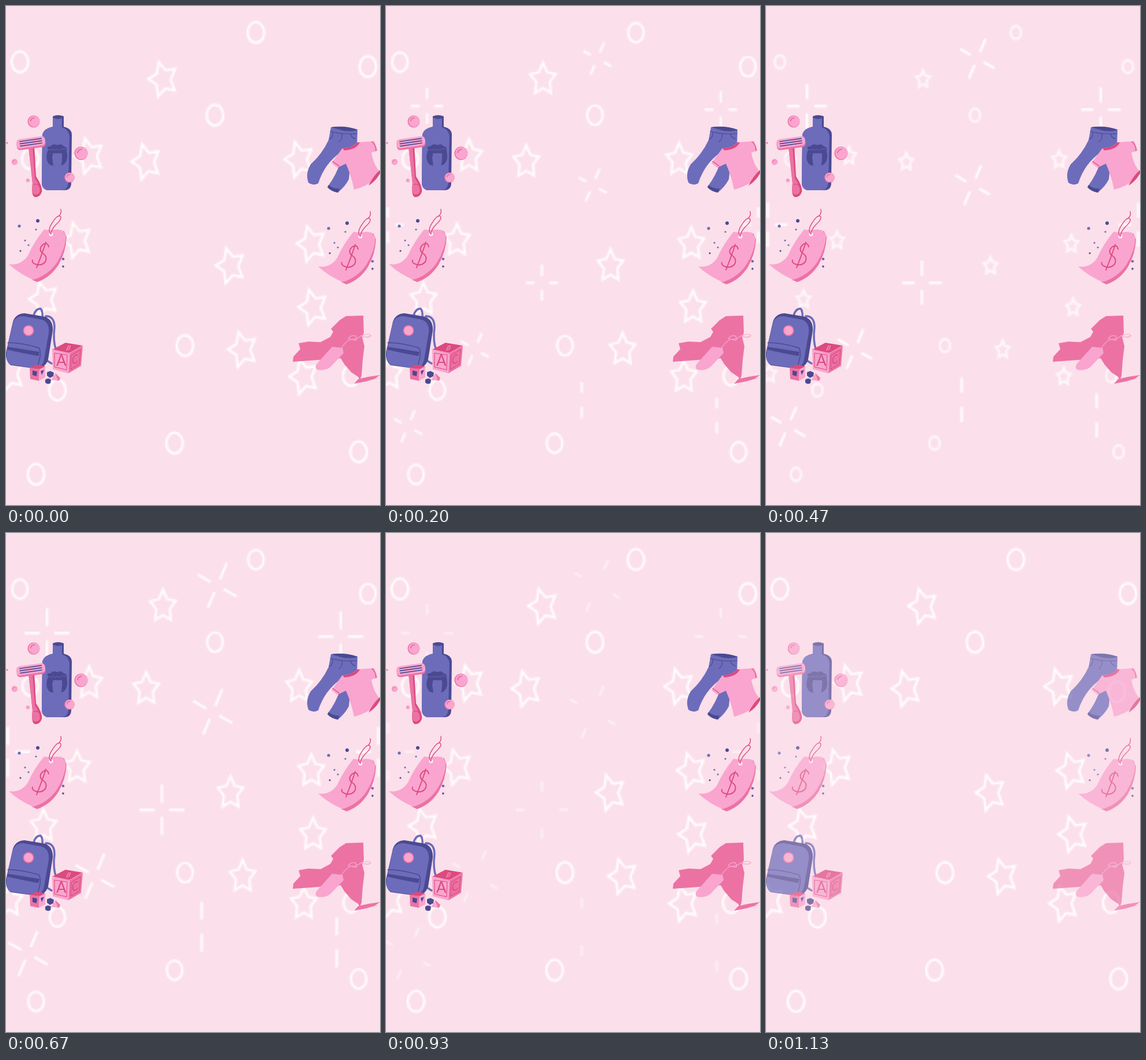
An HTML page with a canvas for the animation above (1190 ms loop, 648 by 864 pixels).

```html
<!DOCTYPE html>
<html lang="en">
<head>
<meta charset="utf-8">
<title>Pink essentials</title>
<style>
  html, body { margin: 0; width: 100%; height: 100%; overflow: hidden; background: #fbdfea; }
  canvas, svg { position: absolute; left: 0; top: 0; width: 648px; height: 864px; }
  text { font-family: Lato, sans-serif; }
  .blue { fill: #6c6cbb; } .navy { fill: #4b4991; }
  .pale { fill: #f9a5cf; } .rose { fill: #ec72a4; } .red { fill: #dc4a7e; }
  .line { fill: none; stroke-linecap: round; stroke-linejoin: round; }
  .sNavy { stroke: #4b4991; } .sRed { stroke: #dc4a7e; } .sPale { stroke: #f9a5cf; } .sBlue { stroke: #6c6cbb; }
</style>
</head>
<body>
<canvas width="216" height="288"></canvas>
<svg id="icons" viewBox="0 0 648 864">
  <defs>
    <g id="tag">
      <path class="rose" d="M100 389L105 400Q104 425 91 448Q77 470 54 478L45 474Z"/>
      <path class="pale" d="M66 387Q76 389 88 387L97 388L104 397Q103 420 89 443Q74 466 47 474Q22 463 5 447Q26 450 38 432Q48 409 66 387Z"/>
      <circle cx="78" cy="395" r="3.6" fill="#fdeaf3"/>
      <path class="line sRed" stroke-width="1.4" d="M78 395Q71 388 81 374Q89 361 94 364Q98 368 87 378Q79 386 78 394M91 364Q97 359 95 352"/>
      <path class="line sRed" stroke-width="1.9" d="M74 417Q72 408 64 413Q56 420 62 427Q73 433 68 443Q61 451 51 447Q44 444 46 440M69 409Q63 428 53 453"/>
      <g class="blue">
        <circle cx="23" cy="381" r="2.6"/><circle class="navy" cx="55" cy="372" r="3"/>
        <circle cx="52" cy="387" r="1.6"/><circle cx="33" cy="406" r="1.6"/>
        <circle cx="39" cy="414" r="1.6"/><circle class="navy" cx="25" cy="424" r="1.6"/>
        <circle cx="99" cy="438" r="2.3"/><circle class="navy" cx="99" cy="451" r="1.8"/>
      </g>
    </g>
    <g id="bubble">
      <circle class="rose" r="10"/><circle class="pale" cx=".7" cy="-.2" r="9.2"/>
      <path class="line" stroke="#ec72a4" stroke-width="2" d="M-5 -1Q-4 -6 1 -6"/>
    </g>
  </defs>

  <!-- bottle -->
  <path class="navy" d="M81 191Q90 187 100 191L100 209Q114 212 114 223L113 308Q112 319 101 319L72 319Q63 317 62 308L63 222Q66 212 81 209Z"/>
  <path class="blue" d="M81 193Q90 198 97 194L97 210Q109 214 110 226L108 307Q106 319 97 319L72 319Q63 317 62 308L63 222Q66 212 81 209Z"/>
  <path class="navy" d="M73 249Q69 242 77 243Q82 237 89 241Q96 237 100 243Q107 244 105 251Q109 268 99 275Q88 279 76 275Q66 266 73 249Z"/>
  <path class="blue" d="M80 262Q82 256 81 255L97 255Q98 266 95 278Q88 280 82 277Z"/>
  <path class="line sBlue" stroke-width=".8" d="M73 248Q78 251 81 248Q86 251 89 248Q94 251 97 247Q101 249 104 247"/>

  <!-- razor -->
  <path class="red" d="M39 243L49 241L52 295Q64 313 62 322Q59 331 50 331Q43 328 46 308Z"/>
  <path class="rose" d="M39 244L46 242L50 298Q61 315 58 323Q53 329 47 325Q44 319 46 306Z"/>
  <path class="line sRed" stroke-width="1.2" d="M48 309Q56 306 61 317"/>
  <g transform="rotate(-8 43 236)">
    <rect class="rose" x="18" y="229" width="50" height="18" rx="6"/>
    <rect class="pale" x="18" y="228" width="50" height="16" rx="6"/>
    <path class="line sNavy" stroke-width="1.6" d="M24 232H62M24 236H62M24 240H62"/>
  </g>
  <use href="#bubble" transform="translate(48 200)scale(1.05)"/>
  <use href="#bubble" transform="translate(130 255)scale(1.15)"/>
  <use href="#bubble" transform="translate(110 297)scale(.88)"/>
  <use href="#bubble" transform="translate(15 270)scale(.5)"/>
  <use href="#bubble" transform="translate(38 302)scale(.3)"/>
  <circle class="rose" cx="2" cy="237" r="1.5"/>

  <!-- jeans and shirt -->
  <path class="blue" d="M563 210Q586 207 609 214L608 246L597 270L594 300Q588 312 575 323Q565 321 557 313Q572 294 580 268L579 254Q552 273 541 307Q532 312 524 306Q518 290 528 274Q548 256 559 232Z"/>
  <path class="navy" d="M563 210Q586 206 609 214Q603 218 585 216ZM559 310Q567 317 578 316L575 323Q563 321 557 314Z"/>
  <path class="line sNavy" stroke-width="1.2" d="M562 217Q581 223 608 221M582 221Q584 230 577 235M566 219Q567 228 560 231M597 222Q599 229 606 230"/>
  <path class="pale" d="M583 246Q598 247 609 236L638 234L644 250L633 254Q637 276 648 287Q637 309 603 318Q599 296 589 273L574 280L564 272Z"/>
  <path class="red" d="M583 246Q600 246 609 236L613 236Q607 249 586 250ZM648 284Q637 293 628 311Q640 304 648 290Z"/>
  <path class="line sRed" stroke-width="1.2" d="M634 235Q641 240 641 251M566 269L577 277"/>

  <use href="#tag"/>
  <use href="#tag" x="536" y="4"/>

  <!-- backpack -->
  <path class="line sBlue" stroke-width="3.5" d="M48 536Q51 524 60 524Q64 528 63 540M69 537Q84 537 84 556Q81 581 87 596M68 612L79 619"/>
  <path class="navy" d="M11 551Q14 533 32 532L68 538Q82 544 81 562L73 612Q68 627 53 628L8 622Q-1 615 0 600Z"/>
  <path class="blue" d="M11 553Q14 537 30 537L62 543Q76 548 74 566L66 612Q63 627 50 627L8 621Q-1 615 1 600Z"/>
  <path class="line sNavy" stroke-width="1.5" d="M3 583Q29 583 57 592Q63 601 54 625"/>
  <path class="navy" d="M2 590Q30 594 58 599L56 606Q28 601 2 595Z"/>
  <circle class="rose" cx="39" cy="562" r="9.5"/>
  <circle class="pale" cx="39" cy="562" r="8" stroke="#ec72a4" stroke-dasharray="2 1.5"/>

  <!-- toy blocks -->
  <path class="pale" d="M80 596L110 601L108 636L81 629Z"/>
  <path class="red" d="M80 595L103 583L133 588L110 602Z"/>
  <path class="rose" d="M110 601L133 588L130 623L108 636Z"/>
  <path class="line sRed" stroke-width="1.1" d="M84 601L106 604L105 630L84 625ZM113 605L129 595L127 620L112 629Z"/>
  <path class="line sPale" stroke-width="1" d="M80 595L110 601L133 588M110 601L108 635"/>
  <text class="red" x="87" y="623" font-size="26">A</text>
  <text class="red" font-size="21" transform="translate(114 622)skewY(-25)scale(.8 1)">C</text>
  <text class="pale" font-size="11" transform="translate(103 596)skewX(-25)">B</text>
  <path class="rose" d="M41 626L58 629L57 649L42 646Z"/>
  <path class="pale" d="M58 629L68 624L68 643L57 649Z"/>
  <path class="red" d="M41 626L54 621L68 624L58 629Z"/>
  <path class="navy" d="M46 631L54 633L53 641L46 639ZM60 632L66 630L62 639ZM71 634L77 632L83 635L82 641L76 644L71 640ZM68 647Q73 643 78 647L77 653Q72 656 68 652Z"/>
  <path class="rose" d="M79 647L86 636L94 644L92 649Z"/>
  <path class="pale" d="M79 647L86 637L90 649Z"/>

  <!-- map with label -->
  <path class="rose" d="M497 615L498 607L510 594L507 584L524 581L545 582L562 573L567 564L563 559L578 544L589 537L619 536L620 566L617 573L621 589L618 613L616 640L613 648L610 642L598 634L586 620L580 610L497 616ZM603 654L610 646L628 642L648 639L639 645L648 643L624 650Z"/>
  <path class="pale" d="M565 590L583 592L585 601L562 625Q554 632 540 630Q533 626 539 619Z"/>
  <path class="line sPale" stroke-width="1.3" d="M578 597Q588 580 598 577Q613 582 605 571Q598 569 593 576Q604 580 615 571Q630 566 632 571Q627 576 615 571"/>
</svg>

<script>
const ctx = document.querySelector('canvas').getContext('2d');
const icons = document.getElementById('icons');
const LOOP = 1190, STEPS = 18;

// Centres of the background doodles
const stars = [
  [272, 127], [144, 260], [243, 270], [508, 266], [123, 406], [529, 412],
  [389, 450], [65, 508], [532, 522], [410, 595], [516, 642], [6, 637]
];
const rings = [
  [433, 46], [24, 97], [627, 105], [362, 189], [42, 265], [608, 275],
  [310, 588], [89, 665], [598, 640], [292, 757], [611, 772], [52, 811]
];
const pluses = [[71, 173], [580, 179], [270, 479], [3, 379], [645, 379]];
const dashes = [[339, 682], [573, 709]];
const crosses = [[366, 91], [358, 310], [154, 594], [38, 728]];

const clamp = v => Math.max(0, Math.min(1, v));

// Strokes one path at each centre, narrowed and tilted.
function stamp(centres, narrow, deg, trace) {
  for (const [x, y] of centres) {
    ctx.save();
    ctx.translate(x, y);
    ctx.scale(narrow, 1);
    ctx.rotate(deg * Math.PI / 180);
    ctx.beginPath();
    trace();
    ctx.restore();
    ctx.stroke();
  }
}

function starPath(r) {
  for (let i = 0; i < 10; i++) {
    const a = i * Math.PI / 5, d = i % 2 ? r * .52 : r;
    ctx.lineTo(d * Math.sin(a), -d * Math.cos(a));
  }
  ctx.closePath();
}

function armPair(from, to) {
  for (const s of [-1, 1]) {
    ctx.moveTo(0, s * from);
    ctx.lineTo(0, s * to);
  }
}

function crossPath(from, to) {
  armPair(from, to);
  ctx.rotate(Math.PI / 2);
  armPair(from + 2, to);
}

function draw(t) {
  ctx.setTransform(1 / 3, 0, 0, 1 / 3, 0, 0);
  ctx.clearRect(0, 0, 648, 864);
  ctx.strokeStyle = '#fff';
  ctx.lineWidth = 4.3;

  // Stars and rings shrink once per loop; stars stand upright meanwhile.
  const dip = Math.exp(-(((t - 435) / 175) ** 2));
  ctx.globalAlpha = .92 - .2 * dip;
  stamp(stars, .8, -17 * (1 - clamp(6 * dip)), () => starPath(32 - 17 * dip));
  const r = 18 - 7 * dip;
  stamp(rings, .8, 0, () => ctx.arc(0, 0, r, 0, 7));

  // Sparkles grow steadily, then burst apart and fade.
  const from = 12 + .15 * Math.max(0, t - 800), to = 26 + .026 * t;
  ctx.globalAlpha = .92 * clamp(t / 220) * clamp((1000 - t) / 130);
  stamp(pluses, .9, 0, () => crossPath(from, to));
  stamp(dashes, .9, 0, () => armPair(from, to));
  stamp(crosses, .87, 26, () => crossPath(from, to));

  icons.style.opacity = t >= 1130 ? .7 : 1;
}

// Steps begin every fifteenth of a second, rounded to 10 ms.
const stepStart = i => Math.round(i * 20 / 3) * 10;

function tick() {
  const t = performance.now() % LOOP;
  let i = STEPS - 1;
  while (stepStart(i) > t) i--;
  draw(stepStart(i));
  requestAnimationFrame(tick);
}
tick();
</script>
</body>
</html>
```
